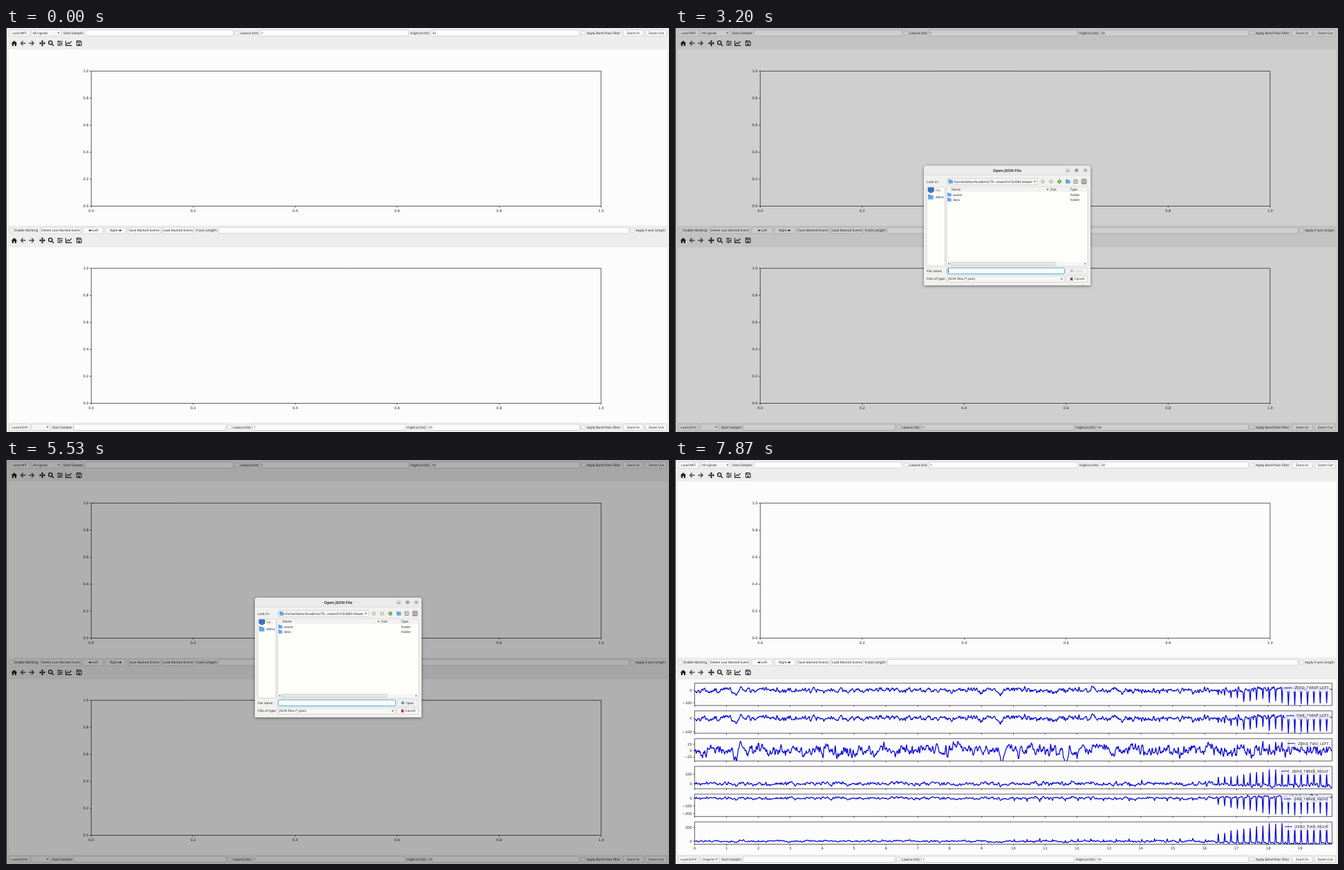
Animation, 959 px wide and 584 px high, one loop 8 s. Source, as an HTML page with a canvas:

```html
<!DOCTYPE html>
<html lang="en">
<head>
<meta charset="utf-8">
<title>Signal viewer</title>
<style>
  html, body { margin: 0; width: 100%; height: 100%; overflow: hidden; background: #efefef; }
  canvas { display: block; width: 959px; height: 584px; }
</style>
</head>
<body>
<canvas id="stage" width="959" height="584"></canvas>
<script>
const ctx = document.getElementById('stage').getContext('2d');
const LOOP = 8000;
const UI = '"Noto Sans", sans-serif', PLOT = '"DejaVu Sans", sans-serif';
const INK = '#242424', SPINE = '#343440', BLUE = '#0808d8';

// ---------- drawing helpers ----------
function text(s, x, y, { align = 'left', size = 4.65, font = UI, color = INK, weight = '' } = {}) {
  ctx.font = `${weight} ${size}px ${font}`;
  ctx.textAlign = align;
  ctx.textBaseline = 'alphabetic';
  ctx.textRendering = 'geometricPrecision';
  ctx.fillStyle = color;
  ctx.fillText(s, x, y + size * 0.36);
}
const plotText = (s, x, y, align) => text(s, x, y, { align, size: 5.1, font: PLOT });

function box(x1, y1, x2, y2, fill, stroke, radius = 1, width = 0.6) {
  ctx.beginPath();
  ctx.roundRect(x1, y1, x2 - x1, y2 - y1, radius);
  if (fill) { ctx.fillStyle = fill; ctx.fill(); }
  if (stroke) { ctx.strokeStyle = stroke; ctx.lineWidth = width; ctx.stroke(); }
}
function path(d, x, y, { fill, stroke = '#202020', width = 1 } = {}) {
  ctx.save();
  ctx.translate(x, y);
  const p = new Path2D(d);
  if (fill) { ctx.fillStyle = fill; ctx.fill(p); }
  else { ctx.strokeStyle = stroke; ctx.lineWidth = width; ctx.stroke(p); }
  ctx.restore();
}
function disc(x, y, r, fill, stroke) {
  ctx.beginPath();
  ctx.arc(x, y, r, 0, 7);
  ctx.fillStyle = fill;
  ctx.fill();
  if (stroke) { ctx.strokeStyle = stroke; ctx.lineWidth = 0.7; ctx.stroke(); }
}
const arrow = (x, y) => path('M-1.6-.8h3.2L0 1z', x, y, { fill: '#444' });
const field = (x1, x2, y, s = '') => {
  box(x1, y - 4.3, x2, y + 4.5, '#fcfcfc', '#bdbdbd');
  text(s, x1 + 2, y);
};
const button = (x1, x2, y, s) => {
  box(x1, y - 4.5, x2, y + 4.6, '#f8f8f8', '#c0c0c0');
  text(s, (x1 + x2) / 2, y, { align: 'center' });
};
const combo = (x1, x2, y, s) => {
  box(x1, y - 4.5, x2, y + 4.6, '#f6f6f6', '#c4c4c4');
  text(s, x1 + 2.3, y);
  arrow(x2 - 4, y);
};
const check = (x, y, s) => {
  box(x, y - 2.6, x + 5.2, y + 2.6, '#fcfcfc', '#bdbdbd', 0.6);
  text(s, x + 7.6, y);
};

// ---------- main window ----------
function toolbar(y) {
  path('M-4.3 .2L0-3.8 4.3 .2H3.1V4H.9V1.2H-.9V4h-2.2V.2z', 11.9, y, { fill: '#202020' });
  path('M3.7 0H-3M0-3.2L-3.2 0 0 3.2', 24.7, y, { stroke: '#484848', width: 1.3 });
  path('M-3.7 0H3M0-3.2L3.2 0 0 3.2', 37, y, { stroke: '#484848', width: 1.3 });
  path('M-3.5 0h7M0-3.5v7', 52.5, y, { width: 1.3 });
  path('M0-4.5l2 2h-4zM0 4.5l2-2h-4zM-4.5 0l2-2v4zM4.5 0l-2-2v4z', 52.5, y, { fill: '#202020' });
  path('M1.6-.8a2.6 2.6 0 1 1-5.2 0a2.6 2.6 0 1 1 5.2 0M1 1.1L3.8 3.9', 65.2, y, { width: 1.4 });
  path('M-4-2.6h8M-4 0h8M-4 2.6h8', 78, y, { width: 0.9 });
  path('M-2.2-3.7h1.5v2.2h-1.5zM1-1.1h1.5v2.2H1zM-1.5 1.5H0v2.2h-1.5z', 78, y, { fill: '#202020' });
  path('M-4.2-3.4v6.8h8.6M-3 1.6L-.8-1 .9.6 4-2.8', 90.7, y, { width: 1.1 });
  path('M-3.4-3.4h5.6l1.2 1.2v5.6h-6.8zM-2-3.2v2.1h3.6v-2.1M-1 1.2h2v1.2h-2z', 105.7, y, { width: 1 });
}

function emptyAxes(top) {
  const left = 123.3, width = 737.5, height = 195.2;
  box(left, top, left + width, top + height, null, SPINE, 0, 0.8);
  for (let i = 0; i <= 5; i++) {
    const x = left + width * i / 5, y = top + height * (1 - i / 5), label = (i / 5).toFixed(1);
    ctx.fillStyle = INK;
    ctx.fillRect(x - 0.4, top + height, 0.8, 2);
    ctx.fillRect(left - 2, y - 0.4, 2, 0.8);
    plotText(label, x, top + height + 6.2, 'center');
    plotText(label, left - 3.8, y + 0.1, 'right');
  }
}

function zoomControls(y) {
  check(832.5, y, 'Apply Band-Pass Filter');
  button(892.5, 922, y, 'Zoom In');
  button(925.5, 955.5, y, 'Zoom Out');
}

function mainWindow(loaded) {
  ctx.fillStyle = '#ededed';
  ctx.fillRect(0, 0, 959, 584);
  ctx.fillStyle = '#fcfcfc';
  ctx.fillRect(4, 31, 952.5, 254.5);
  ctx.fillRect(4, 317, 952.5, 253.5);
  ctx.fillStyle = '#333';
  ctx.fillRect(0, 0, 1, 584);

  button(5, 34, 7.2, 'Load MFF');
  combo(36.5, 80, 7.2, 'All signals');
  text('Start Sample:', 83, 7.2);
  field(114.5, 328.5, 7.2);
  check(331.5, 7.2, 'Lowcut (Hz):');
  field(367.3, 582, 7.2, '1');
  text('Highcut (Hz):', 585, 7.2);
  field(614.7, 829.5, 7.2, '50');
  zoomControls(7.2);
  toolbar(22);
  emptyAxes(62.3);

  check(4.6, 292.5, 'Enable Marking');
  button(50, 108, 292.5, 'Delete Last Marked Event');
  button(111, 141, 292.5, '     Left');
  path('M-2.2 0L0-1.6V-.6h2.2V.6H0v1z', 121.6, 292.6, { fill: INK });
  button(144, 174, 292.5, 'Right     ');
  path('M2.2 0L0-1.6V-.6h-2.2V.6H0v1z', 165, 292.6, { fill: INK });
  button(177, 223, 292.5, 'Save Marked Events');
  button(225.5, 272, 292.5, 'Load Marked Events');
  text('X-axis Length:', 274.8, 292.5);
  field(307.3, 901, 292.5);
  check(903.5, 292.5, 'Apply X-axis Length');
  toolbar(307);
  if (loaded) signalPlots(); else emptyAxes(347.3);

  button(5, 34, 577, 'Load JSON');
  combo(37, 64, 577, loaded ? 'Original' : '');
  text('Start Sample:', 67, 577);
  field(98.3, 318, 577);
  check(320.7, 577, 'Lowcut (Hz):');
  field(356.5, 577.3, 577, '1');
  text('Highcut (Hz):', 580, 577);
  field(609.3, 829.5, 577, '50');
  zoomControls(577);
}

// ---------- recorded signals ----------
const hash = n => { const v = Math.sin(n * 127.1) * 43758.5453; return (v - Math.floor(v)) * 2 - 1; };
function noise(t, freq, seed) {
  const p = t * freq, i = Math.floor(p), f = p - i, s = f * f * (3 - 2 * f);
  return hash(i + seed * 977) * (1 - s) + hash(i + 1 + seed * 977) * s;
}
const bump = (t, at, w) => Math.exp(-(((t - at) / w) ** 2));
const background = (t, seed) => 0.55 * noise(t, 6, seed) + 0.85 * noise(t, 17, seed + 1)
  + 0.75 * noise(t, 34, seed + 2) + 0.35 * noise(t, 60, seed + 3);
const events = t => -1.8 * bump(t, 1.3, 0.09) + 1.9 * bump(t, 1.43, 0.06)
  - 1.7 * bump(t, 9.62, 0.06) - 1.6 * bump(t, 11.65, 0.06) + 1.2 * bump(t, 8.3, 0.08);

// Stimulation pulses every 0.2 s, weak after 10 s and growing from 16.4 s on.
function pulse(t) {
  if (t < 10) return 0;
  const k = Math.round((t - 16.43) / 0.2), dt = t - 16.43 - k * 0.2;
  const gain = k < 0 ? (k % 2 ? 0.03 : 0.13) : Math.min(1, 0.45 + 0.07 * k);
  const rebound = dt < 0 ? 0.16 * (1 + dt * 4) : 0.1;
  return gain * (Math.exp(-((dt / 0.014) ** 2)) - rebound);
}

// zero: y of value 0; ticks: [label, y]; amp and spike in pixels
const channels = [
  { name: 'ZERO_THREE_LEFT', top: 322.6, zero: 333, ticks: [['0', 333], ['−100', 351]], seed: 3, amp: 3, spike: -20 },
  { name: 'ONE_THREE_LEFT', top: 362.7, zero: 373.4, ticks: [['0', 373.4], ['−100', 392.7]], seed: 3, amp: 3.2, spike: -20 },
  { name: 'ZERO_TWO_LEFT', top: 402.8, zero: 420, ticks: [['25', 410.8], ['0', 420], ['−25', 429.4]], seed: 21, amp: 6.8, spike: 9 },
  { name: 'ZERO_THREE_RIGHT', top: 442.9, zero: 468, ticks: [['100', 454.3], ['0', 468]], seed: 40, amp: 2.1, spike: 23 },
  { name: 'ONE_THREE_RIGHT', top: 483, zero: 489, ticks: [['0', 489], ['−100', 499.8], ['−200', 511]], seed: 40, amp: 1.5, spike: -25 },
  { name: 'ZERO_TWO_RIGHT', top: 523.1, zero: 551, ticks: [['200', 531], ['0', 551]], seed: 60, amp: 1.1, spike: 28 },
];

function signalPlots() {
  const left = 28.4, right = 950.4, second = 46.1, height = 32.3;
  channels.forEach((c, n) => {
    const bottom = c.top + height;
    ctx.save();
    ctx.beginPath();
    ctx.rect(left, c.top, right - left, height);
    ctx.clip();
    ctx.beginPath();
    for (let t = 0; t <= 20; t += 0.01) {
      const value = background(t, c.seed) + events(t) * (n < 3 ? 1 : 0.5);
      ctx.lineTo(left + t * second, c.zero - c.amp * value - c.spike * pulse(t));
    }
    ctx.strokeStyle = BLUE;
    ctx.lineWidth = 1.25;
    ctx.lineJoin = 'round';
    ctx.stroke();
    ctx.restore();

    box(left, c.top, right, bottom, null, SPINE, 0, 0.8);
    ctx.fillStyle = INK;
    for (let s = 0; s < 20; s++) ctx.fillRect(left + s * second - 0.4, bottom, 0.8, 1.8);
    for (const [label, y] of c.ticks) {
      ctx.fillStyle = INK;
      ctx.fillRect(left - 2, y - 0.4, 2, 0.8);
      plotText(label, left - 3.8, y, 'right');
    }
    ctx.font = `5.2px ${PLOT}`;
    const labelLeft = 945.3 - ctx.measureText(c.name).width;
    box(labelLeft - 17, c.top + 2, 947.8, c.top + 11.8, 'rgba(252,252,252,.8)', '#d4d4d4');
    ctx.fillStyle = '#1a1aa8';
    ctx.fillRect(labelLeft - 15, c.top + 6.4, 11, 1);
    text(c.name, 945.3, c.top + 6.9, { align: 'right', size: 5.2, font: PLOT });
  });
  for (let s = 0; s < 20; s++) plotText(String(s), left + s * second, 561.4, 'center');
}

// ---------- file dialog ----------
function folder(x, y, size = 1) {
  ctx.fillStyle = '#3f85c8';
  ctx.fillRect(x, y - 3 * size, 3 * size, 2);
  box(x, y - 2.2 * size, x + 6.4 * size, y + 2.8 * size, '#62a8e4', null, 0.5);
}

function dialogFrame(active) {
  ctx.save();
  ctx.shadowColor = 'rgba(0,0,0,.5)';
  ctx.shadowBlur = 4;
  ctx.shadowOffsetY = 1;
  box(360, 199, 601, 372, active ? '#f0f0ee' : '#f9f9f5', null, [4, 4, 0, 0]);
  ctx.restore();
  box(360, 199, 601, 212.5, '#ebebeb', null, [4, 4, 0, 0]);
  ctx.fillStyle = '#d6d6d6';
  ctx.fillRect(360, 212, 241, 0.6);
  const color = active ? '#303030' : '#8c8c8c';
  text('Open JSON File', 480.5, 205.7, { align: 'center', size: 5.5, weight: 'bold', color });
  const glyphs = ['M-1.5 1h3', 'M-1.3-1.3h2.6v2.6h-2.6z', 'M-1.3-1.3l2.6 2.6M1.3-1.3l-2.6 2.6'];
  glyphs.forEach((d, i) => {
    const x = 568 + i * 12.8;
    disc(x, 205.7, 3.8, '#dadada');
    path(d, x, 205.7, { stroke: '#444', width: 0.7 });
  });
}

function dialogBody(cursor, canOpen, pressed) {
  text('Look in:', 364, 222);
  combo(393.5, 524.5, 222, '');
  folder(395.5, 222);
  text('/home/dalno/Academic/Th...esearch/ClinDBS-Viewer', 403, 222);
  disc(532, 222, 2.3, '#e4e4e4', '#909090');
  disc(544, 222, 2.3, '#e4e4e4', '#909090');
  disc(556, 222, 2.3, '#6aa83a', '#3d7a12');
  path('M-1.2 0h2.4M0-1.2v2.4', 556, 222, { stroke: '#e4f0da', width: 0.8 });
  folder(565, 222);
  box(588, 218.2, 595.2, 225.6, '#d0d0d0', '#888');
  box(577, 219.3, 582.2, 224.6, '#fafafa', '#444', 0.4);
  path('M-1.4-1h1M.6-1h1M-1.4 1h1M.6 1h1', 579.5, 222, { width: 0.8 });
  box(589.2, 219.3, 594.2, 224.6, '#fafafa', '#444', 0.4);
  path('M-1.5-1.2h3M-1.5 0h3M-1.5 1.2h3', 591.7, 222, { width: 0.5 });

  box(364, 230, 390.5, 344, '#fdfdfa', '#c0c0c0', 0.5);
  box(366, 230.8, 374.3, 236.7, '#2f74c4', '#285a96', 0.6);
  ctx.fillStyle = '#365f90';
  ctx.fillRect(368, 237, 4.5, 1.3);
  text('Co...', 376.7, 234.8);
  folder(366, 244.4, 1.2);
  ctx.save();
  ctx.beginPath();
  ctx.rect(364, 230, 25.5, 114);
  ctx.clip();
  text('dalno', 376.7, 244.4);
  ctx.restore();

  box(393, 230, 597, 344, '#fdfdfa', '#c0c0c0', 0.5);
  ctx.fillStyle = '#f2f2f2';
  ctx.fillRect(393.4, 230.4, 203.2, 6.8);
  text('Name', 400, 233.6);
  arrow(538.8, 233.6);
  text('Size', 543, 233.6);
  text('Type', 571.7, 233.6);
  ctx.fillStyle = '#d4d4d4';
  for (const x of [541.3, 570]) ctx.fillRect(x, 230.5, 0.5, 6.5);
  [['assets', 241], ['data', 248.2]].forEach(([name, y]) => {
    folder(394, y, 0.9);
    text(name, 402, y);
    text('Folder', 571.7, y);
  });
  ctx.fillStyle = '#f6f6f6';
  ctx.fillRect(393.4, 338, 203.2, 5.6);
  box(398.5, 338.5, 551, 343.2, '#e6e6e6', '#c4c4c4');
  path('M1-1.4L-.8 0 1 1.4z', 395.6, 340.8, { fill: '#444' });
  path('M-1-1.4L.8 0-1 1.4z', 593.6, 340.8, { fill: '#444' });

  text('File name:', 364, 351);
  box(393.7, 346.8, 563.3, 355.5, '#fcfcfc', '#45aed8', 1, 1);
  if (cursor) {
    ctx.fillStyle = '#222';
    ctx.fillRect(395.3, 348.3, 0.7, 5.6);
  }
  const openInk = canOpen ? INK : '#b8b8b8';
  box(566, 346.8, 596.5, 355.5, pressed ? '#dcdcdc' : '#f2f2f2', '#cfcfcf');
  box(571.8, 349, 576, 353, canOpen ? '#6b9cc8' : '#c4c4c4', null, 0.5);
  text('Open', 578.2, 351.1, { color: openInk });

  text('Files of type:', 364, 362.8);
  combo(393, 563.3, 362.8, 'JSON Files (*.json)');
  box(566, 358.4, 596.5, 367.2, '#f8f8f8', '#c0c0c0');
  path('M-1.8-2L1.8 2M1.8-2L-1.8 2', 573.5, 362.8, { stroke: '#8c1c28', width: 1.3 });
  text('Cancel', 577.5, 362.8);
}

// ---------- timeline ----------
const easeOut = (t, start, length) => {
  const p = Math.min(1, Math.max(0, (t - start) / length));
  return p * (2 - p);
};

function draw(t) {
  mainWindow(t >= 7800);
  const dim = 0.3 * (easeOut(t, 3000, 550) - easeOut(t, 7150, 350));
  ctx.fillStyle = `rgba(0,0,0,${dim})`;
  ctx.fillRect(0, 0, 959, 584);

  const shown = easeOut(t, 2930, 150) - easeOut(t, 7160, 100);
  if (shown <= 0) return;
  const active = t < 7070;
  ctx.save();
  ctx.globalAlpha = shown;
  ctx.translate(0, 285.5);
  ctx.scale(1, shown);
  ctx.translate(0, -285.5);
  dialogFrame(active);
  if (active) dialogBody(t < 3670, t >= 5530, t >= 6470 && t < 6870);
  ctx.restore();
}

function tick() {
  draw(performance.now() % LOOP);
  requestAnimationFrame(tick);
}
tick();
</script>
</body>
</html>
```
